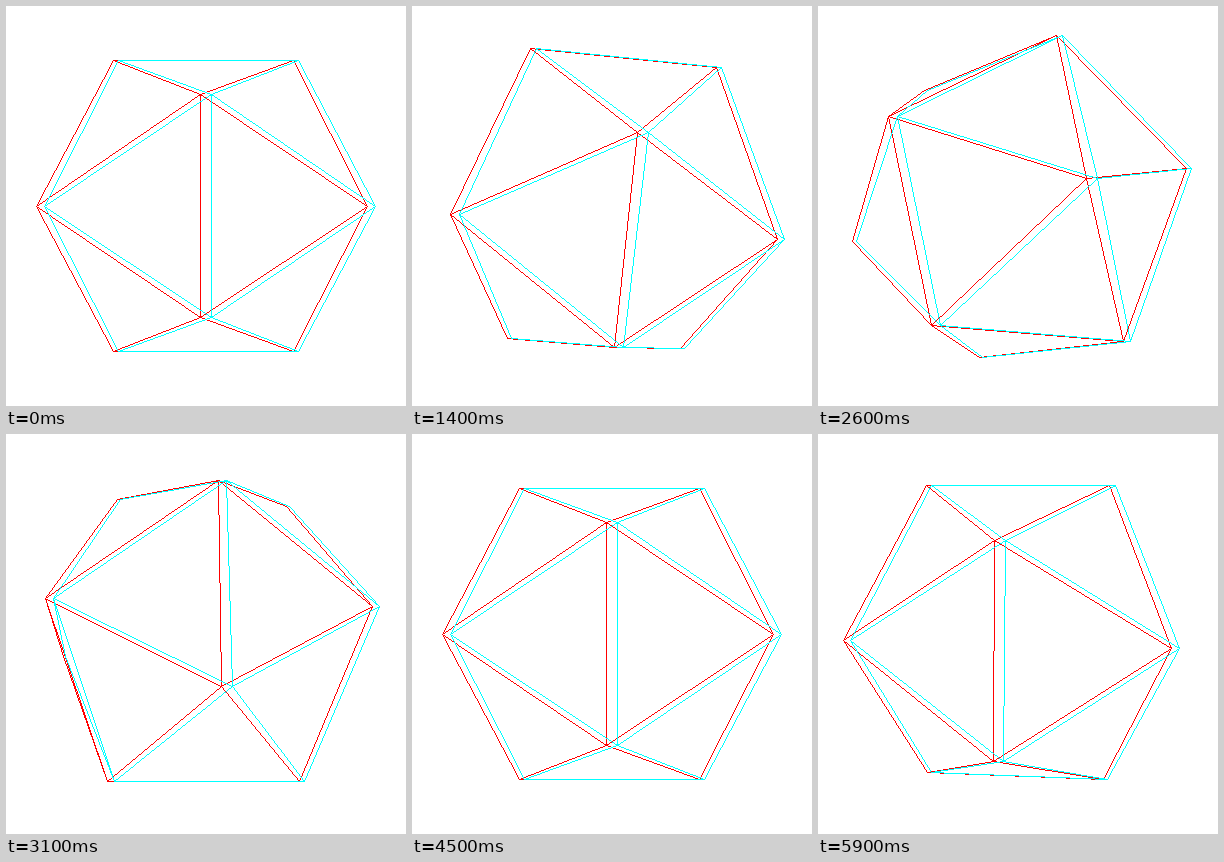
Animation, 400 px wide and 400 px high, one loop 6000 ms. Source, as an HTML page with a canvas:

```html
<!DOCTYPE html>
<html lang="en">
<head>
<meta charset="utf-8">
<title>Anaglyph icosahedron</title>
<style>
  html, body { margin: 0; width: 100%; height: 100%; overflow: hidden; background: #fff; }
  canvas { display: block; width: 400px; height: 400px; image-rendering: pixelated; }
</style>
</head>
<body>
<canvas id="stage" width="400" height="400"></canvas>
<script>
const ctx = document.getElementById('stage').getContext('2d');
const SIZE = 400, STEP = 100, STEPS = 60;
const PHI = (1 + Math.sqrt(5)) / 2;
const FOCAL = 756, DIST = 8.38;         // perspective
const EYE = 0.128, SHIFT = 9.28;        // half eye distance, half screen shift
const EYES = [['#f00', -1], ['#0ff', 1]];

const verts = [];
for (const a of [-1, 1]) for (const b of [-PHI, PHI])
  verts.push([0, a, b], [a, b, 0], [b, 0, a]);

const dist2 = (p, q) => p.reduce((sum, v, i) => sum + (v - q[i]) ** 2, 0);
const touch = (i, j) => Math.abs(dist2(verts[i], verts[j]) - 4) < 1e-6;
const det = ([a, b, c], [d, e, f], [g, h, i]) =>
  a * (e * i - f * h) - b * (d * i - f * g) + c * (d * h - e * g);

// Triangles with the sign of their winding
const faces = [];
for (let i = 0; i < 12; i++)
  for (let j = i + 1; j < 12; j++)
    for (let k = j + 1; k < 12; k++)
      if (touch(i, j) && touch(i, k) && touch(j, k))
        faces.push([i, j, k, Math.sign(det(verts[i], verts[j], verts[k]))]);

function rotX([x, y, z], a) {
  const c = Math.cos(a), s = Math.sin(a);
  return [x, y * c - z * s, y * s + z * c];
}

function rotY([x, y, z], a) {
  const c = Math.cos(a), s = Math.sin(a);
  return [x * c + z * s, y, z * c - x * s];
}

function project([x, y, z], side) {
  const s = FOCAL / (DIST - z);
  return [SIZE / 2 + x * s + side * (EYE * s - SHIFT), SIZE / 2 + y * s];
}

function facesEye(pts, [i, j, k, wind]) {
  const p = pts[i], q = pts[j], r = pts[k];
  return wind * ((q[0] - p[0]) * (r[1] - p[1]) - (q[1] - p[1]) * (r[0] - p[0])) > 0;
}

// One pixel wide line without smoothing
function line(p, q) {
  const [x0, y0] = p.map(Math.floor), [x1, y1] = q.map(Math.floor);
  const n = Math.max(Math.abs(x1 - x0), Math.abs(y1 - y0), 1);
  for (let i = 0; i <= n; i++)
    ctx.fillRect(Math.round(x0 + (x1 - x0) * i / n), Math.round(y0 + (y1 - y0) * i / n), 1, 1);
}

function draw(step) {
  const a = step / STEPS * 2 * Math.PI;
  const turned = verts.map(v => rotX(rotY(rotX(v, -a), a), 2 * a));
  const views = EYES.map(([, side]) => turned.map(v => project(v, side)));
  // Both colours show the faces that the first eye sees
  const visible = faces.filter(face => facesEye(views[0], face));
  ctx.fillStyle = '#fff';
  ctx.fillRect(0, 0, SIZE, SIZE);
  EYES.forEach(([color], eye) => {
    const pts = views[eye];
    ctx.fillStyle = color;
    for (const [i, j, k] of visible) {
      line(pts[i], pts[j]);
      line(pts[i], pts[k]);
      line(pts[j], pts[k]);
    }
  });
}

const start = performance.now();
let shown = 0;
function tick() {
  const step = Math.floor((performance.now() - start) / STEP) % STEPS;
  if (step !== shown) draw(shown = step);
  requestAnimationFrame(tick);
}
draw(0);
requestAnimationFrame(tick);
</script>
</body>
</html>
```
